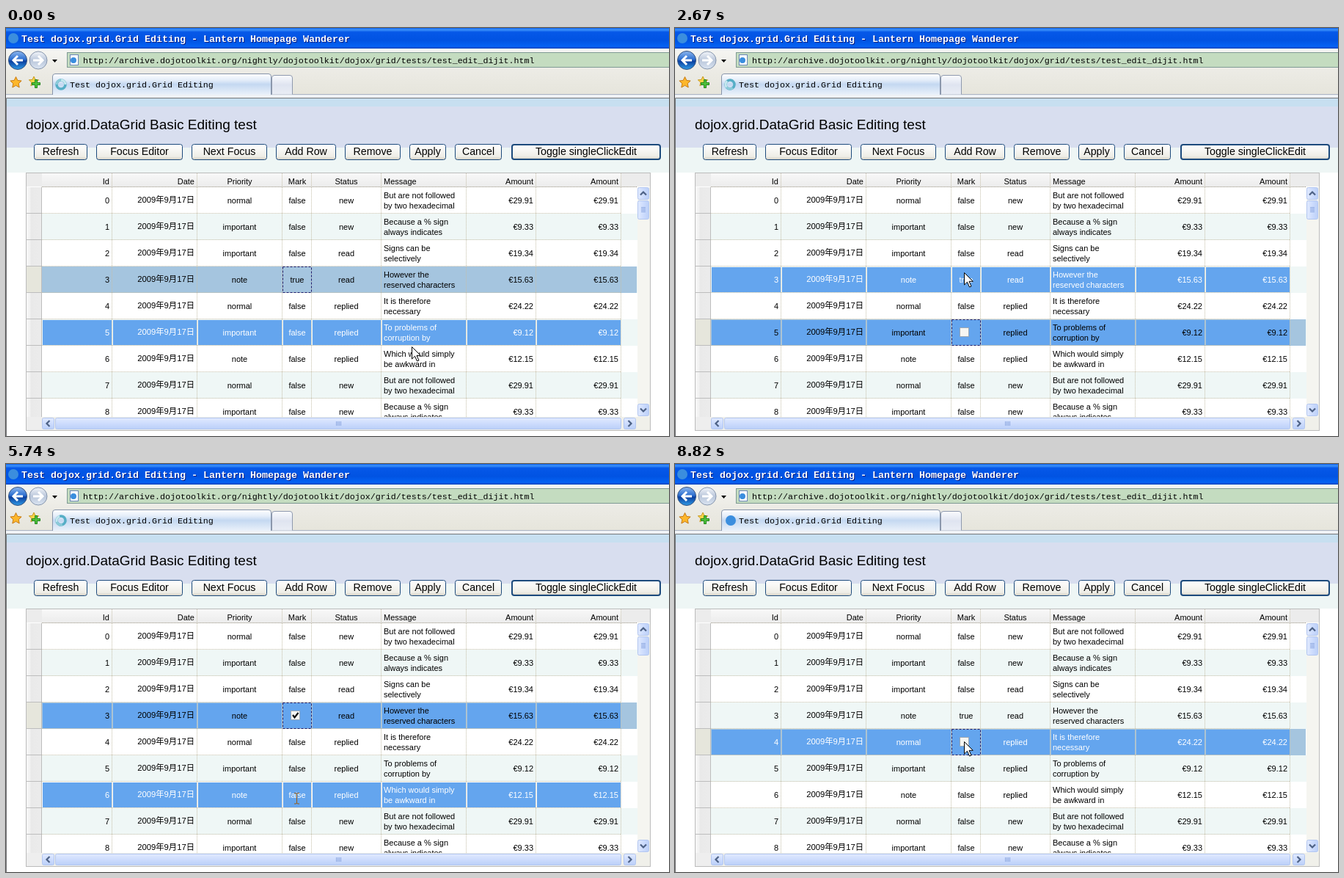
Recreate the animation shown at these times as an HTML page. Size 904x556 px, loop 9.48 s.

```html
<!DOCTYPE html>
<html lang="en">
<head>
<meta charset="utf-8">
<title>Grid editing</title>
<style>
html, body { margin: 0; width: 100%; height: 100%; overflow: hidden; background: #fff; }
svg { display: block; }
text { font: 11px "Liberation Sans", "Noto Sans CJK SC", "Noto Sans CJK", sans-serif; white-space: pre; }
.title { font: bold 13.333px "Liberation Mono", monospace; }
.mono { font: 11.667px "Liberation Mono", monospace; }
.heading { font-size: 19px; }
.button { font-size: 14.2px; }
.date { font-size: 11.3px; }
.beam { mix-blend-mode: difference; }
</style>
</head>
<body>
<svg id="stage" width="904" height="556" viewBox="0 0 904 556">
  <defs><clipPath id="body"><rect x="28" y="217" width="833" height="313"/></clipPath></defs>
</svg>
<script>
const stage = document.getElementById('stage');
const defs = stage.querySelector('defs');

function el(name, attrs = {}, parent = stage) {
  const node = document.createElementNS('http://www.w3.org/2000/svg', name);
  for (const key in attrs) node.setAttribute(key, attrs[key]);
  return parent.appendChild(node);
}
const rect = (x, y, width, height, fill, more = {}, parent) =>
  el('rect', { x, y, width, height, fill, ...more }, parent);
const path = (d, more = {}, parent) => el('path', { d, fill: 'none', ...more }, parent);
const circle = (cx, cy, r, fill, more = {}, parent) => el('circle', { cx, cy, r, fill, ...more }, parent);
function text(x, y, content, more = {}, parent) {
  const node = el('text', { x, y, ...more }, parent);
  node.textContent = content;
  return node;
}
function gradient(id, stops, across = false) {
  const g = el('linearGradient', { id, x2: across ? 1 : 0, y2: across ? 0 : 1 }, defs);
  stops.forEach(([offset, color]) => el('stop', { offset, 'stop-color': color }, g));
  return `url(#${id})`;
}
const show = (node, visible) => node.setAttribute('display', visible ? 'inline' : 'none');

// Browser frame
const TAU = Math.PI * 2;
const LOGO = '#3b8ede';
rect(0, 0, 904, 28, gradient('caption', [[0, '#0a5ce6'], [.08, '#3d93fb'], [.2, '#0658e8'], [.6, '#0153e2'], [.9, '#0462f4'], [1, '#0140b8']]));
circle(10, 14, 7, LOGO);
const caption = 'Test dojox.grid.Grid Editing';
const windowTitle = caption + ' - Lantern Homepage Wanderer';
text(22, 20, windowTitle, { class: 'title', fill: '#0a1c80' });
text(21, 19, windowTitle, { class: 'title', fill: '#fff' });

rect(0, 28, 904, 68, gradient('toolbar', [[0, '#f6f6f3'], [.45, '#ecebe5'], [1, '#e5e4da']]));
const roundBlue = gradient('back', [[0, '#8fb8ef'], [.45, '#2d6fd0'], [.55, '#0b3f9f'], [1, '#2f9be6']]);
const roundGrey = gradient('forward', [[0, '#f2f5fa'], [.5, '#b9c6da'], [1, '#dbe5f2']]);
circle(16, 44, 12.5, roundBlue, { stroke: '#33517f' });
circle(44, 44, 12, roundGrey, { stroke: '#8796ad' });
path('M23 44H10M16 38L10 44L16 50', { stroke: '#fff', 'stroke-width': 3 });
path('M37 44H50M44 38L50 44L44 50', { stroke: '#fff', 'stroke-width': 3 });
path('M63 43H70L66.5 47Z', { fill: '#000' });

rect(83.5, 33.5, 830, 20, '#c4dcc0', { stroke: '#7f9a94' });
rect(87.5, 36.5, 11, 14, '#fff', { stroke: '#6b87b5' });
circle(92, 44, 4, LOGO);
text(105, 48, 'http://archive.dojotoolkit.org/nightly/dojotoolkit/dojox/grid/tests/test_edit_dijit.html', { class: 'mono' });

function star(cx, cy, r, fill, stroke) {
  const points = Array.from({ length: 10 }, (_, i) => {
    const a = i * TAU / 10 - TAU / 4, d = i % 2 ? r * .48 : r;
    return [cx + d * Math.cos(a), cy + d * Math.sin(a)].map(v => v.toFixed(1)).join();
  });
  el('polygon', { points: points.join(' '), fill, stroke });
}
star(13.5, 74.5, 8, '#fdb72b', '#c77a14');
star(38, 73, 7, '#fbd548', '#c79a24');
path('M39.5 70.5h3v4h4v3h-4v4h-3v-4h-4v-3h4z', { fill: '#4fc03c', stroke: '#21861b' });

path('M0 90.5H904', { stroke: '#a9b2c2' });
rect(0, 91, 904, 4, '#eff2f6');
path('M63.5 91V66Q63.5 62.5 67 62.5H358Q361.5 62.5 361.5 66V91', {
  fill: gradient('tab', [[0, '#fdfeff'], [.3, '#e4edf9'], [.5, '#c4d8f1'], [1, '#eaf1fa']]), stroke: '#8794aa' });
path('M362.5 90.5V68Q362.5 64.5 366 64.5H387Q390.5 64.5 390.5 68V90.5', {
  fill: gradient('newTab', [[0, '#fafbfe'], [.5, '#dfe4f0'], [1, '#e9edf5']]), stroke: '#8f9aae' });
text(87, 81, caption, { class: 'mono' });
const spinner = el('g');
circle(75, 77, 6, 'none', { stroke: '#56aec6', 'stroke-width': 3.5 }, spinner);
path('M75 71A6 6 0 0 1 81 77', { stroke: '#c6e8ef', 'stroke-width': 3 }, spinner);
path('M69 77A6 6 0 0 1 75 71', { stroke: '#8dcbd9', 'stroke-width': 3 }, spinner);
const tabLogo = circle(76, 77, 7, LOGO);

// Page
rect(0, 95, 904, 461, '#fff');
rect(1, 96, 903, 11, '#c7dff0');
rect(1, 107, 903, 56, '#d8deef');
rect(1, 163, 903, 34, '#eef6f5');
path('M904 95.5H.5V556', { stroke: '#77787a' });
text(27, 138, 'dojox.grid.DataGrid Basic Editing test', { class: 'heading' });

const buttonFace = gradient('face', [[0, '#fff'], [.8, '#eeede6'], [1, '#d3cec2']]);
[['Refresh', 38, 111], ['Focus Editor', 123, 241], ['Next Focus', 253, 356], ['Add Row', 368, 450],
 ['Remove', 462, 538], ['Apply', 550, 600], ['Cancel', 612, 676], ['Toggle singleClickEdit', 689, 893],
].forEach(([label, left, right], i) => {
  const line = i === 7 ? 2 : 1;
  rect(left + line / 2, 158 + line / 2, right - left - line, 22 - line, buttonFace,
    { rx: 3, stroke: '#1c4a7c', 'stroke-width': line });
  text((left + right) / 2, 173, label, { class: 'button', 'text-anchor': 'middle' });
});

// Grid
const TOP = 217, ROW = 36;
const edges = [144, 260, 376, 416, 511, 627, 722, 838];
const columns = [[141, 'end'], [257, 'end'], [318.5, 'middle'], [397, 'middle'], [464, 'middle'],
                 [515, 'start'], [719, 'end'], [835, 'end']];
const DOTS = { stroke: '#c5bfa9', 'stroke-dasharray': '1 1' };
rect(27.5, 197.5, 851, 351, '#fff', { stroke: '#bcbcbc' });
rect(28, 198, 850, 18, '#ececec');
rect(49, 198, 790, 18, gradient('header', [[0, '#f8f8f8'], [1, '#ececec']]));
['Id', 'Date', 'Priority', 'Mark', 'Status', 'Message', 'Amount', 'Amount'].forEach((label, i) => {
  text(columns[i][0], 213, label, { 'text-anchor': columns[i][1] });
  path(`M${edges[i] + .5} 198V216`, DOTS);
});
path('M49 216.5H861', { stroke: '#8c8674', 'stroke-dasharray': '1 1' });

const data = [
  ['normal', 'false', 'new', 'But are not followed', 'by two hexadecimal', 29.91],
  ['important', 'false', 'new', 'Because a % sign', 'always indicates', 9.33],
  ['important', 'false', 'read', 'Signs can be', 'selectively', 19.34],
  ['note', 'true', 'read', 'However the', 'reserved characters', 15.63],
  ['normal', 'false', 'replied', 'It is therefore', 'necessary', 24.22],
  ['important', 'false', 'replied', 'To problems of', 'corruption by', 9.12],
  ['note', 'false', 'replied', 'Which would simply', 'be awkward in', 12.15],
];
const body = el('g', { 'clip-path': 'url(#body)' });
const rowHeader = gradient('rowHeader', [[0, '#f7f7f7'], [.25, '#f1f1f1'], [.3, '#e9e9e9'], [1, '#ececec']], true);

const rows = Array.from({ length: 9 }, (_, i) => {
  const y = TOP + i * ROW;
  const [priority, mark, status, line1, line2, amount] = data[i % 7];
  const head = rect(28, y, 20, 35, rowHeader, {}, body);
  path(`M28 ${y + 35.5}H48`, { stroke: '#bdbdbd' }, body);
  rect(49, y, 812, ROW, i % 2 ? '#eff7f6' : '#fff', {}, body);
  const strip = rect(49, y, 811, ROW, '#a5c5df', {}, body);
  // Highlighted cells leave their one-pixel borders free, so the row colour shows between them
  const bar = el('g', { fill: '#64a5ee' }, body);
  edges.forEach((right, c) => {
    const left = c ? edges[c - 1] + 2 : 50;
    el('rect', { x: left, y: y + 1, width: right - left, height: 34 }, bar);
    path(`M${right + .5} ${y}V${y + 35}`, DOTS, body);
  });
  path(`M49 ${y + 35.5}H839`, DOTS, body);
  const cells = el('g', {}, body);
  const cell = (column, dy, content, more = {}) =>
    text(columns[column][0], y + dy, content, { 'text-anchor': columns[column][1], ...more }, cells);
  cell(0, 22, i);
  cell(1, 21, '2009年9月17日', { class: 'date' });
  cell(2, 22, priority);
  const markText = cell(3, 22, mark);
  cell(4, 22, status);
  cell(5, 15, line1);
  cell(5, 29, line2);
  cell(6, 22, '€' + amount);
  cell(7, 22, '€' + amount);
  return { head, strip, bar, cells, markText };
});
path('M48.5 217V530', { stroke: '#bdbdbd' });

// Focus outline and cell editor, placed on the active row
const focus = el('g');
rect(377.5, .5, 39, 35, 'none', { stroke: '#1d1d6e', 'stroke-dasharray': '3 2' }, focus);
const editor = el('g', {}, focus);
rect(388.5, 11.5, 12, 12, '#f6f6f3', { stroke: '#9aa7b5' }, editor);
const tick = path('M391 17L393.5 20.5L398.5 14', { stroke: '#111', 'stroke-width': 2.2 }, editor);

// Scroll bars
const knobStops = [[0, '#e1eafe'], [.5, '#cddcfd'], [1, '#bbcff8']];
const knobAcross = gradient('knobAcross', knobStops, true);
const knobDown = gradient('knobDown', knobStops);
rect(861, 217, 17, 313, '#f5f5f0');
rect(49, 530, 829, 18, '#f0f0ea');
rect(28, 530, 21, 18, '#eeeeee');
function knob(x, y, w, h, fill, arrow) {
  rect(x + .5, y + .5, w - 1, h - 1, fill, { rx: 2, stroke: '#b2c6f0' });
  if (arrow !== undefined)
    path('M-4 2L0 -2L4 2', { stroke: '#4d6185', 'stroke-width': 2.2,
      transform: `translate(${x + w / 2} ${y + h / 2}) rotate(${arrow})` });
}
knob(861, 217, 16, 17, knobAcross, 0);
knob(861, 235, 16, 26, knobAcross);
knob(861, 512, 16, 17, knobAcross, 180);
knob(49, 531, 17, 16, knobDown, -90);
knob(67, 531, 772, 16, knobDown);
knob(842, 531, 17, 16, knobDown, 90);
for (let i = 0; i < 4; i++) {
  path(`M866 ${244.5 + i * 2}h6`, { stroke: '#8ca7e0' });
  path(`M${450.5 + i * 2} 536v6`, { stroke: '#8ca7e0' });
}

// Pointers
const arrow = path('M.5.5V17L4.5 13.2L7.5 20L10 19L7 12.3H12.3Z', { fill: '#fff', stroke: '#000' });
const beam = path('M-3 -7.5H-1Q0 -7.5 .5 -6.5Q1 -7.5 2 -7.5H4M.5 -7V6.5M-3 7H-1Q0 7 .5 6Q1 7 2 7H4', { stroke: '#fff', class: 'beam' });

const LOOP = 9480, STEP = 60;
const track = [
  [0, 553, 434], [120, 550, 433], [780, 394, 414], [1950, 392, 413], [2580, 394, 333], [3120, 394, 338],
  [3960, 394, 338], [4440, 388, 482], [4680, 387, 468], [4920, 390, 482], [5220, 396, 456],
  [6600, 396, 456], [6780, 400, 421], [6960, 400, 421], [7500, 394, 378], [LOOP, 394, 378],
];
// Time of click, active row, time its text follows the pointer again
const clicks = [[0, 3, 0], [840, 5, 1080], [3120, 3, 3360], [5800, 6, 6240], [8440, 4, 8820]];
const beamSpans = [[5220, 5800], [6660, 8440]];
const busySpans = [[0, 6290], [6620, 7520], [8380, 8620]];
const clamp = (v, lo, hi) => Math.min(hi, Math.max(lo, v));

function pointerAt(t) {
  const i = track.findIndex(([end]) => t < end);
  const [t0, x0, y0] = track[i - 1], [t1, x1, y1] = track[i];
  const p = (t - t0) / (t1 - t0), k = p * p * (3 - 2 * p);
  return [x0 + (x1 - x0) * k, y0 + (y1 - y0) * k].map(Math.round);
}

function render(t) {
  const stepped = t - t % STEP;
  const [x, y] = pointerAt(stepped);
  const hovered = Math.floor((y - TOP - 2) / ROW);
  const [clickTime, active, wake] = clicks.filter(([at]) => at <= t).pop();
  const editing = clickTime > 0;

  rows.forEach((row, i) => {
    const current = i === active;
    const lit = i === hovered && !(current && t < wake);
    show(row.strip, current);
    show(row.bar, lit || (current && editing));
    show(row.markText, !(current && editing));
    row.head.setAttribute('fill', current ? '#e6e6dc' : rowHeader);
    row.cells.setAttribute('fill', lit ? '#fff' : '#000');
  });
  focus.setAttribute('transform', `translate(0 ${TOP + active * ROW})`);
  show(editor, editing);
  show(tick, active === 3);

  const isBeam = beamSpans.some(([from, to]) => t >= from && t < to);
  show(arrow, !isBeam);
  show(beam, isBeam);
  (isBeam ? beam : arrow).setAttribute('transform', `translate(${x} ${y})`);

  const turned = busySpans.reduce((sum, [from, to]) => sum + clamp(stepped - from, 0, to - from), 0);
  spinner.setAttribute('transform', `rotate(${turned * .36} 75 77)`);
  show(spinner, t < 8560);
  show(tabLogo, t >= 8560);
}

const start = performance.now();
function animate() {
  render((performance.now() - start) % LOOP);
  requestAnimationFrame(animate);
}
animate();
</script>
</body>
</html>
```
